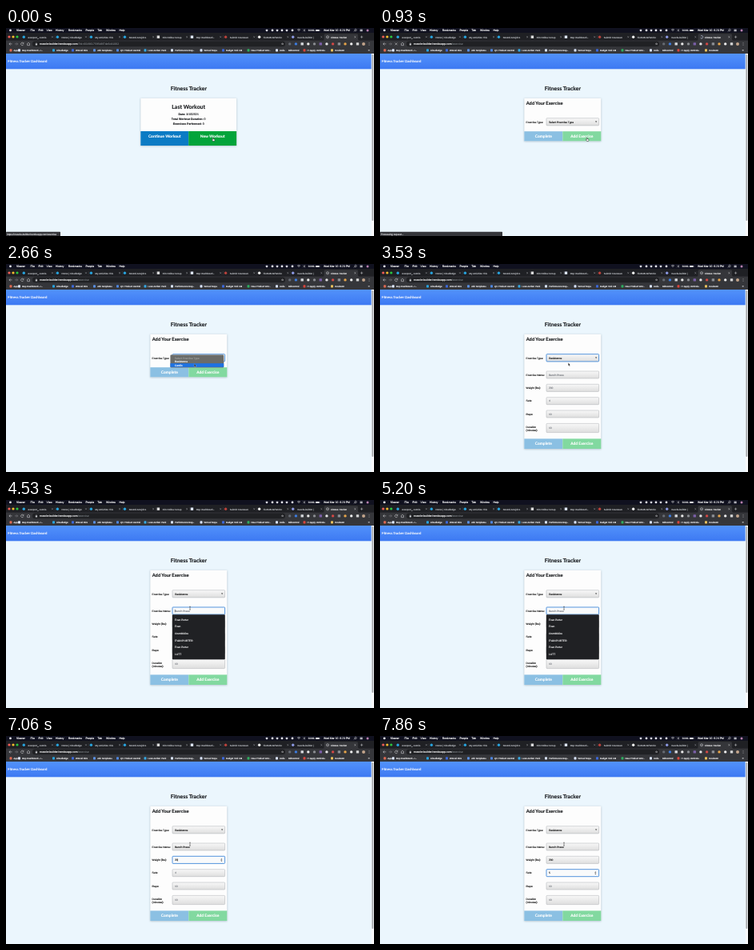
An HTML page that plays this animation: 460x260 px, repeating every 8 s.

```html
<!DOCTYPE html>
<html lang="en">
<head>
<meta charset="utf-8">
<title>Fitness Tracker</title>
<style>
  html, body { margin: 0; width: 100%; height: 100%; overflow: hidden; background: #ebf6fd; }
  svg { display: block; width: 100vw; height: 100vh; }
  text { font-family: "Liberation Sans", Arial, sans-serif; text-rendering: geometricPrecision; white-space: pre; }
  .lato { font-family: Lato, sans-serif; font-weight: 700; }
  .b { font-weight: 700; }
</style>
</head>
<body>
<svg viewBox="0 0 460 260" preserveAspectRatio="none">
  <defs>
    <linearGradient id="head" x2="0" y2="1"><stop stop-color="#5292fb"/><stop offset="1" stop-color="#3d79f2"/></linearGradient>
    <linearGradient id="field" x2="0" y2="1"><stop stop-color="#f8f8f8"/><stop offset="1" stop-color="#dedede"/></linearGradient>
    <filter id="soft" x="-10%" y="-10%" width="120%" height="120%"><feGaussianBlur stdDeviation="1"/></filter>
  </defs>
  <g id="frame"></g>
  <g id="live"></g>
</svg>
<script>
const LOOP = 8000;
const LOADING = 500, FORM = 930, LOADED = 1850, OPEN = 2350, PICKED = 3400, EXPANDED = 3530,
      NAME = 4330, WEIGHT = 6800, SETS = 7330;
const NAME_KEYS = [5400, 5460, 5600, 5700, 5800, 5900, 6000, 6100, 6200, 6330, 6460];
const WEIGHT_KEYS = [6930, 7000, 7130];
const SETS_KEYS = [7530];

const frame = document.getElementById('frame');
const live = document.getElementById('live');
const pen = document.createElement('canvas').getContext('2d');
pen.font = '100px "Liberation Sans", Arial, sans-serif';
const widthOf = (s, size) => pen.measureText(s).width * size / 100;

const rect = (x, y, w, h, fill, extra = '') =>
  `<rect x="${x}" y="${y}" width="${w}" height="${h}" fill="${fill}" ${extra}/>`;
const dot = (x, y, r, fill) => `<circle cx="${x}" cy="${y}" r="${r}" fill="${fill}"/>`;
const line = (d, color, w = .5, extra = '') =>
  `<path d="${d}" fill="none" stroke="${color}" stroke-width="${w}" ${extra}/>`;
// The hairline stroke keeps tiny text crisp
const text = (x, y, s, size, fill, extra = '') =>
  `<text x="${x}" y="${y}" font-size="${size}" fill="${fill}" stroke="${fill}" stroke-width=".13" ${extra}>${s}</text>`;
const title = (x, y, s, size, fill = '#17191c', anchor = 'middle') =>
  text(x, y, s, size, fill, `class="lato" text-anchor="${anchor}"`);

function menuBar() {
  const items = [[13, 'Viewer'], [30.5, 'File'], [40.5, 'Edit'], [50.5, 'View'], [62, 'History'], [78, 'Bookmarks'],
    [99.5, 'People'], [114.5, 'Tab'], [125, 'Window'], [141.5, 'Help']];
  let s = rect(0, 0, 460, 6, '#10111f') + dot(5.5, 2.9, 1.4, '#e8e8ee');
  items.forEach(([x, label], i) => s += text(x, 4, label, 3.4, '#fff', i ? '' : 'class="b"'));
  [326, 333, 339, 345, 351, 358].forEach((x, i) =>
    s += i % 2 ? dot(x, 2.9, 1.4, '#e6e6ec') : rect(x - 1.2, 1.7, 2.4, 2.5, '#d5d5dc', 'rx=".6"'));
  s += line('M364 2.3q2-1.6 4 0M365 3.3q1-.8 2 0', '#eee', .6) + line('M371.5 1.5l2 2.8v-2.8l-2 2.8', '#ddd', .4);
  s += text(377.5, 4, '100%', 3.2, '#fff') + rect(387, 1.9, 4.6, 2.2, '#eee', 'rx=".5"') + rect(391.9, 2.5, .5, 1, '#eee');
  s += line('M435 4.4l1.3-1.3', '#eee', .6) + '<circle cx="437" cy="2.5" r="1.2" fill="none" stroke="#eee" stroke-width=".5"/>';
  s += rect(442.5, 1.7, 3.2, 1, '#e6e6ec') + rect(442.5, 3.2, 3.2, 1, '#e6e6ec') + dot(452, 3, 1.5, '#b77fae');
  return s;
}

function tabStrip() {
  const tabs = ['evanport_..tutoria', 'Home | Cloudledge', 'My Activities This', 'Kestrel Analytics', 'Elm Hollow Group',
    'Rep Dashboard -', 'Submit Coursewo', 'hk2046LM/Worko', 'muscle-builder |', 'Fitness Tracker'];
  const icons = ['#28a2dc', '#28a2dc', '#28a2dc', '#28a2dc', '#dedede', '#dfe7fa', '#b8423c', '#f0f0f0', '#8a97e0'];
  let s = rect(0, 6, 460, 10, '#1f2024');
  ['#f55f57', '#f8bd2e', '#2ac840'].forEach((c, i) => s += dot(4 + i * 5, 11, 1.6, c));
  s += '<path d="M396 16q1.5 0 1.5-1.8V9q0-1.8 1.8-1.8h39q1.8 0 1.8 1.8v5.2q0 1.8 1.5 1.8z" fill="#35363a"/>';
  tabs.forEach((label, i) => {
    const x = 27.5 + i * 42.05, color = i === 9 ? '#f4f4f5' : '#b4b7bc';
    if (icons[i]) s += i === 4 || i === 5 ? rect(x - 7, 9.5, 3.4, 3.4, icons[i]) : dot(x - 5.2, 11.3, 1.7, icons[i]);
    s += text(x, 12.5, label, 2.95, color);
    s += line(`M${x + 29.5} 10.3l1.9 1.9m0-1.9l-1.9 1.9`, color, .4);
    if (i < 8) s += line(`M${x + 33.8} 9v4.5`, '#55575c', .3);
  });
  return s + line('M443 11.2h3.2m-1.6-1.6v3.2', '#d8d8da', .5);
}

function toolBar() {
  let s = rect(0, 15.6, 460, 16.4, '#35363a');
  s += line('M7.5 19.9h-3.6m1.6-1.6l-1.6 1.6l1.6 1.6', '#e4e4e6') + line('M11 19.9h3.6m-1.6-1.6l1.6 1.6l-1.6 1.6', '#8a8b90');
  s += line('M26.2 20l1.9-1.8l1.9 1.8m-3.3-.3v2h2.8v-2', '#e4e4e6');
  s += rect(33, 16.6, 316, 6.7, '#202124', 'rx="3.3"');
  s += rect(36.8, 19.6, 2.3, 1.9, '#c5c7ca', 'rx=".3"') + line('M37.2 19.7v-.7q.75-1 1.5 0v.7', '#c5c7ca', .4);
  s += text(344, 21.2, '☆', 3.5, '#d6d6d8');
  const ext = ['#666b73', '#3d7de0', '#d9dce0', '#e8e8e8', '#8b8d92', '#7b5fa8', '#e4e4e6', '#d24845', '#8d9095',
    '#e7a54a', '#ececec', '#d6d6d6'];
  ext.forEach((c, i) => {
    const x = 354.7 + i * 7.7;
    s += i % 3 === 2 ? rect(x - 1.6, 18.2, 3.4, 3.4, c, 'rx=".6"') : dot(x, 19.9, 1.7, c);
  });
  s += dot(447, 19.9, 2, '#c2a48b');
  [18.4, 19.9, 21.4].forEach(y => s += dot(454, y, .4, '#e4e4e6'));
  return s;
}

function bookmarks() {
  const items = [[9.5, 'Apps', '#e06a52'], [20, 'Rep Dashboard - L..', '#d9e3fa'], [63, 'Cloudledge', '#28a2dc'],
    [87, 'Worvel Hire', '#3d68d8'], [114, 'Job Templates', '#5a8fe0'], [143, 'QV Product Central', '#4f86dd'],
    [177.5, 'Lean Amber Pack', '#36a7e0'], [211, 'Performance Rep..', '#d9e3fa'], [247.5, 'Worvel Sops', '#d9e3fa'],
    [275, 'Budget Tool FM', '#3d68d8'], [306.5, 'New Product Wor..', '#30ad60'], [342, 'Calls', '#d9e3fa'],
    [353, 'BidCentral', ''], [376.5, 'IT Apply Verticals', '#d8453c'], [411, 'Incubator', '#e8c05c']];
  return items.map(([x, label, c]) =>
    (c ? rect(x - 5, 26.3, 3, 3.1, c, 'rx=".7"') : '') + text(x, 28.9, label, 2.9, '#f0f0f2')).join('')
    + text(452.5, 29, '»', 4, '#d6d6d8');
}

function pageBase() {
  return rect(0, 32, 460, 228, '#ebf6fd') + rect(0, 32, 456.8, 19.3, 'url(#head)')
    + text(2.3, 42.7, 'Fitness Tracker Dashboard', 4.25, '#fff', 'style="font-family:Lato,sans-serif"')
    + rect(456.8, 32, 3.2, 228, '#f8f9fa') + rect(457.4, 33, 1.9, 208, '#a4a7ab', 'rx=".9"')
    + title(228.3, 77.8, 'Fitness Tracker', 6.82);
}

function card(x, y, w, h) {
  return rect(x, y + .5, w, h, '#8397a5', 'opacity=".65" filter="url(#soft)"') + rect(x, y, w, h, '#fdfdfd', 'rx=".8"');
}

function buttons(x, y, w, h, base, left, right, colors) {
  const half = w / 2;
  return rect(x, y, half, h, colors[0]) + rect(x + half, y, half, h, colors[1])
    + title(x + half / 2, base, left, 4.92, '#fff') + title(x + half * 1.5, base, right, 4.92, '#fff');
}

function home() {
  const rows = [['Date:', '3/10/2021'], ['Total Workout Duration:', '0'], ['Exercises Performed:', '0']];
  return card(168.3, 87.7, 119.8, 59.3) + title(228.2, 100.7, 'Last Workout', 6.95)
    + rows.map(([k, v], i) => text(228.2, 109.2 + i * 5.8, `<tspan class="b">${k}</tspan> ${v}`, 3.5,
      '#17191c', 'text-anchor="middle"')).join('')
    + buttons(168.3, 129, 119.8, 18, 137.3, 'Continue Workout', 'New Workout', ['#0b7bc4', '#03a43b']);
}

const box = (y, h, on, fill = 'url(#field)') =>
  rect(208, y, 65.6, h, fill, `rx=".8" stroke="${on ? '#4189da' : '#aaaeb2'}" stroke-width="${on ? .9 : .5}"`);

function input(label, y, h, hint, value, focus, t, since) {
  const base = y + h / 2 + 1.15;
  const top = base - (label.length - 1) * 1.2;
  let s = label.map((l, i) => text(182.6, top + i * 4.4, l, 3.3, '#111')).join('');
  s += box(y, h, focus, focus ? '#f9fafb' : 'url(#field)') + text(210.9, base, value || hint, 3.3, value ? '#111' : '#777b80');
  if (focus && (t - since) % 1000 < 500) {
    s += rect(210.9 + widthOf(value, 3.3), base - 2.9, .35, 3.7, '#111');
  }
  return s;
}

const typed = (s, keys, t) => s.slice(0, keys.filter(k => t >= k).length);
const lastKey = (keys, start, t) => Math.max(start, ...keys.filter(k => t >= k));

function suggestions() {
  const names = ['Evan Porter', 'Evan', 'Crumbfelice', 'EVAN PORTER', 'Evan Porter', 'LOTT'];
  return rect(207.8, 143.3, 66, 56, '#202124', 'rx=".8"')
    + names.map((n, i) => text(211, 150.7 + i * 8.65, n, 3.2, '#f0f0f1')).join('');
}

function options(t) {
  const pick = t < 2480 ? 0 : t < 2900 ? 2 : 1;
  let s = rect(205.4, 113.6, 66.8, 15.8, '#6b6c69', 'rx="1.2"');
  if (pick) s += rect(205.4, 119.7 + (pick - 1) * 4.5, 66.8, 4.6, '#1d72e3');
  ['Select Exercise Type', 'Resistance', 'Cardio'].forEach((label, i) =>
    s += text(210.8, 118.6 + i * 4.55, label, 3.3, i ? '#fff' : '#9c9f9e'));
  return s;
}

function exercise(t) {
  const big = t >= EXPANDED, bottom = big ? 231 : 141.3;
  const focusSelect = t >= OPEN && t < NAME;
  let s = card(180.3, 87.7, 96, bottom - 87.7) + title(182.7, 95.9, 'Add Your Exercise', 5.75, '#17191c', 'start');
  s += text(182.6, 118.6, 'Exercise Type:', 3.3, '#111') + box(112.7, 9.2, focusSelect);
  s += text(210.9, 118.5, t < PICKED ? 'Select Exercise Type' : 'Resistance', 3.35, '#111');
  s += '<path d="M268.9 116.5h2.4l-1.2 1.6z" fill="#333"/>';
  if (big) {
    const onName = t >= NAME && t < WEIGHT, onWeight = t >= WEIGHT && t < SETS, onSets = t >= SETS;
    s += input(['Exercise Name:'], 134, 9, 'Bench Press', typed('Bench Press', NAME_KEYS, t), onName, t, lastKey(NAME_KEYS, NAME, t));
    s += input(['Weight (lbs):'], 150.3, 9.1, '200', typed('200', WEIGHT_KEYS, t), onWeight, t, lastKey(WEIGHT_KEYS, WEIGHT, t));
    s += input(['Sets:'], 166.7, 9, '4', typed('5', SETS_KEYS, t), onSets, t, 7300);
    s += input(['Reps:'], 183, 9, '10', '', false);
    s += input(['Duration', '(minutes):'], 199.4, 11.2, '10', '', false);
    if (onWeight || onSets) {
      const y = onSets ? 171.2 : 154.9;
      s += `<path d="M268.3 ${y - .5}h2l-1-1.5zM268.3 ${y + .5}h2l-1 1.5z" fill="#444"/>`;
    }
  }
  s += buttons(180.3, big ? 218.4 : 129.2, 96, big ? 12.6 : 12.1, big ? 226.4 : 137.1, 'Complete', 'Add Exercise', ['#8bc0e3', '#82d9a0']);
  if (t >= OPEN && t < PICKED) s += options(t);
  if (t >= NAME && t < NAME_KEYS[0]) s += suggestions();
  return s;
}

// Pointer stops: time, x, y
const PATH = [[0, 258.3, 136.8], [1850, 258.3, 136.8], [2250, 236, 117.5], [2400, 236, 117.8], [2580, 235.3, 124.8],
  [2800, 235.3, 124.8], [2950, 235.3, 123.6], [3650, 235.3, 123.6], [4150, 230, 135], [LOOP, 230, 135]];

function pointer(t) {
  const i = PATH.findIndex(p => p[0] > t), [t0, x0, y0] = PATH[i - 1], [t1, x1, y1] = PATH[i];
  const k = (t - t0) / (t1 - t0), e = k * k * (3 - 2 * k);
  const x = x0 + (x1 - x0) * e, y = y0 + (y1 - y0) * e;
  let glyph;
  if (t < LOADED) glyph = '<path d="M0 .4q.5-.7.9 0v1.5l1.7.5v1.3l-.5 1.1h-1.7l-1.4-1.9q.3-.7 1 .1z" fill="#fff" stroke="#111" stroke-width=".45"/>';
  else if (t > 3650 && y > 133.8) glyph = line('M-.9-2q.9 0 .9.6q0-.6.9-.6M0-1.4v3.2M-.9 2.3q.9 0 .9-.6q0 .6.9.6', '#222', .45);
  else glyph = '<path d="M0 0v3.5l.8-.7.6 1.4.7-.3-.6-1.3h1.1z" fill="#111" stroke="#fff" stroke-width=".25"/>';
  return `<g transform="translate(${x.toFixed(2)} ${y.toFixed(2)})">${glyph}</g>`;
}

function browserState(t) {
  const path = t < FORM ? '/?id=6049617595d8f7de6d41062' : '/exercise';
  let s = text(42, 21.1, `muscle-builder.herokuapp.com<tspan fill="#9aa0a6" stroke="none">${path}</tspan>`, 3.5, '#f4f4f5');
  s += text(397, 4, `Wed Mar 10  ${t < SETS ? '6:23' : '6:24'} PM`, 3.4, '#fff');
  if (t >= LOADING && t < LOADED) {
    s += line('M18.8 18.5l2.8 2.8m0-2.8l-2.8 2.8', '#e4e4e6');
    const turn = Math.round(t * .36 / 25) * 25;
    s += line('M402 9.6a1.7 1.7 0 1 1-1.7 1.7', '#c9d4ee', .6, `transform="rotate(${turn} 402 11.3)"`);
  } else {
    s += line('M21.6 18.9a1.7 1.7 0 1 0 .3 1.6M22 18v1.4h-1.4', '#e4e4e6');
    s += '<circle cx="402" cy="11.3" r="1.6" fill="none" stroke="#d0d2d6" stroke-width=".5"/>' + line('M400.4 11.3h3.2', '#d0d2d6', .4);
  }
  if (t < LOADED) {
    const wide = t >= FORM;
    s += rect(0, 254.8, wide ? 153 : 68, 5.2, '#35363a', 'rx=".6"')
      + text(1.2, 258.6, wide ? 'Processing request...' : 'https://muscle-builder.herokuapp.com/exercise', 3, '#d8d9db');
  }
  return s;
}

frame.innerHTML = pageBase() + menuBar() + tabStrip() + toolBar() + bookmarks();

let shown = '';
function draw(t) {
  const next = (t < FORM ? home() : exercise(t)) + browserState(t) + pointer(t);
  if (next !== shown) live.innerHTML = shown = next;
}

const start = performance.now();
function tick() {
  draw((performance.now() - start) % LOOP);
  requestAnimationFrame(tick);
}
tick();
</script>
</body>
</html>
```
